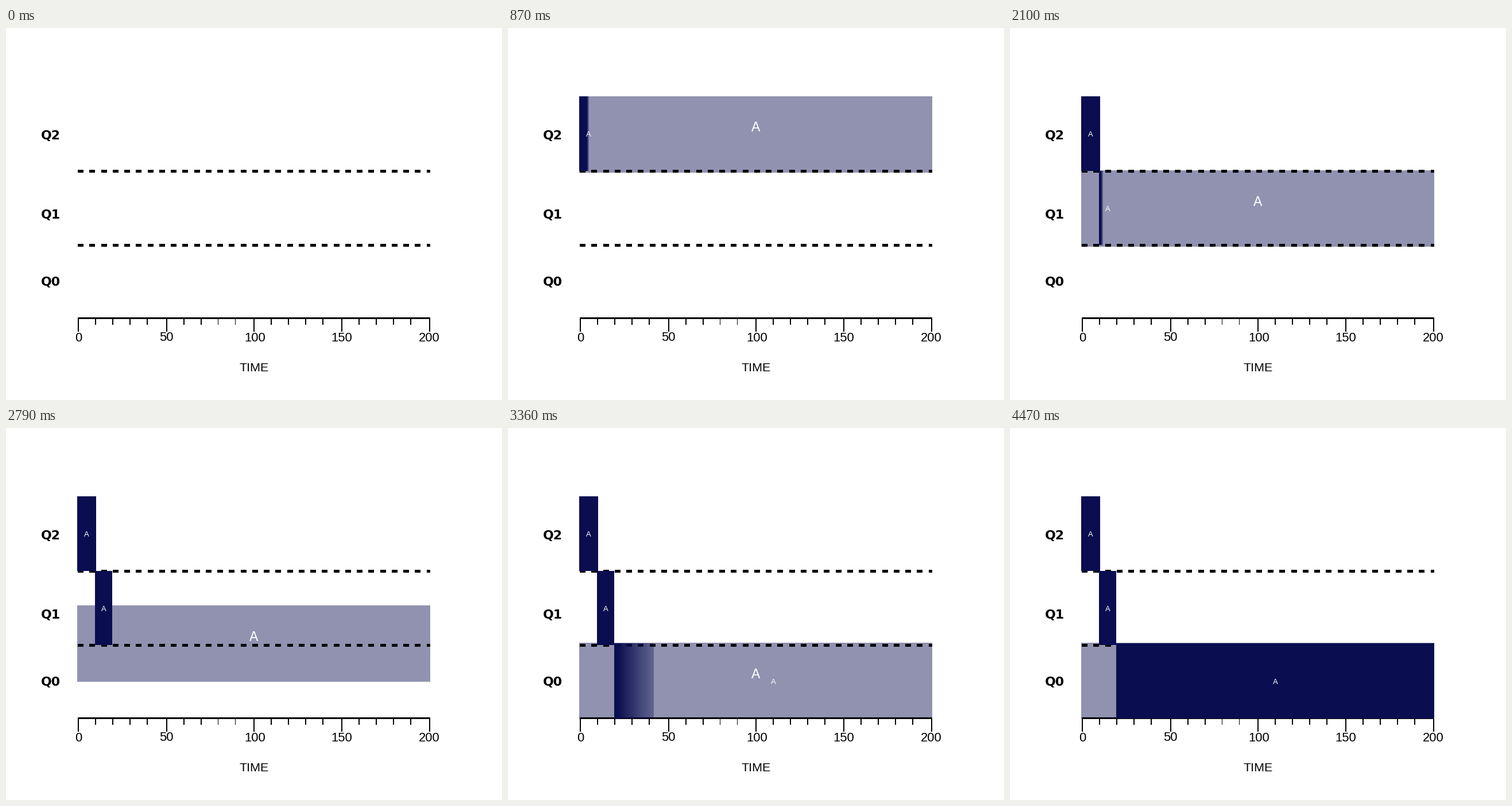
These frames come from a looping animation (864 px wide and 648 px high, 5.25 s). A matplotlib script:

```python
import numpy as np
import matplotlib.pyplot as plt
from matplotlib.animation import FuncAnimation
from matplotlib.patches import Rectangle

W, H, DPI = 864, 648, 100
STEP, LOOP = 30, 5250
PT = 72 / DPI
NAVY = "#0A0E50"
PALE = "#9092B0"
NAVY_RGB = np.array([10, 14, 80]) / 255

# Queue rows: the pale job's top edge, when it starts to move there
ROW_TOPS = (-133, 119, 248, 374)
MOVE_STARTS = (0, 1447, 2700)
MOVE_TIME = 454
JOB_HEIGHT = 133

fig = plt.figure(figsize=(W / DPI, H / DPI), dpi=DPI, facecolor="white")
ax = fig.add_axes([0, 0, 1, 1])
ax.axis("off")


def box(x0, y0, x1, y1, color, z):
    return ax.add_patch(Rectangle((x0, y0), x1 - x0, y1 - y0,
                                  fc=color, lw=0, zorder=z))


def label(x, y, s, size, color="black", z=4, font="Liberation Sans", weight="normal"):
    return ax.text(x, y, s, fontsize=size * PT, color=color, ha="center",
                   va="baseline", family=font, weight=weight, zorder=z)


class Wipe:
    """Navy block revealed from left to right behind a soft edge."""

    def __init__(self, x0, y0, x1, y1, text_y, start, length):
        self.x0, self.y0, self.w, self.h = x0, y0, x1 - x0, y1 - y0
        self.start, self.length = start, length
        self.cols = np.arange(self.w) + 0.5
        self.rgba = np.zeros((1, self.w, 4))
        self.rgba[..., :3] = NAVY_RGB
        self.image = ax.imshow(self.rgba, extent=(x0, x1, y1, y0), aspect="auto",
                               interpolation="nearest", zorder=5)
        self.text = label((x0 + x1) / 2, text_y, "A", 13, "white", 6)

    def draw(self, t):
        p = min(max((t - self.start) / self.length, 0), 1)
        front = 1.125 * self.w * p
        fade = 0.1125 * self.w
        tip = 0.38 * (1 - p)
        depth = front - self.cols
        alpha = np.clip(tip + (1 - tip) * depth / fade, 0, 1)
        self.rgba[0, :, 3] = np.where(depth > 0, alpha, 0)
        self.image.set_data(self.rgba)
        self.image.set_visible(p > 0)
        self.text.set_visible(p > 0)
        if p > 0:
            self.text.set_clip_path(Rectangle((self.x0, self.y0), min(front, self.w),
                                              self.h, transform=ax.transData))


def draw_chart():
    for y in (249.5, 378.5):
        for k in range(31):
            x = 125 + 20.25 * k
            box(x, y - 2.5, min(x + 10, 739), y + 2.5, "black", 3)

    box(125, 504, 739, 507.2, "black", 3)
    majors = (126, 279.8, 432, 585, 737.8)
    for i, x in enumerate(majors):
        box(x - 0.9, 506, x + 0.9, 529, "black", 3)
        if i < 4:
            for k in range(1, 5):
                m = x + 29.9 * k
                box(m - 0.9, 506, m + 0.9, 517, "black", 3)

    for x, y, s in ((126, 546.3, "0"), (279, 545.3, "50"), (434, 546.3, "100"),
                    (585, 546.3, "150"), (737.5, 546.3, "200")):
        label(x, y, s, 22)
    label(432, 597.5, "TIME", 21.5)
    for x, y, s in ((77.5, 194, "Q2"), (77.5, 332, "Q1"), (77.5, 448.7, "Q0")):
        label(x, y, s, 22, font="DejaVu Sans", weight="bold")


draw_chart()
job = box(124.3, 0, 738.8, JOB_HEIGHT, PALE, 1)
job_text = label(432, 0, "A", 23, "white", 2)
wipes = (
    Wipe(124, 119, 157, 249, 189.3, 525, 750),
    Wipe(155, 249, 185, 378, 319, 1975, 630),
    Wipe(185, 375, 739, 506, 445.6, 3222, 1250),
)
ax.set_xlim(0, W)
ax.set_ylim(H, 0)


def job_top(t):
    y = ROW_TOPS[0]
    for start, a, b in zip(MOVE_STARTS, ROW_TOPS, ROW_TOPS[1:]):
        if t >= start:
            u = min((t - start) / MOVE_TIME, 1)
            y = a + (b - a) * (1 - (1 - u) ** 3)
    return y


def update(i):
    t = i * STEP
    top = job_top(t)
    job.set_y(top)
    job_text.set_y(top + 61.5)
    for wipe in wipes:
        wipe.draw(t)
    return []


anim = FuncAnimation(fig, update, frames=LOOP // STEP, interval=STEP,
                     repeat=True, repeat_delay=0, blit=False)
plt.show()
```
